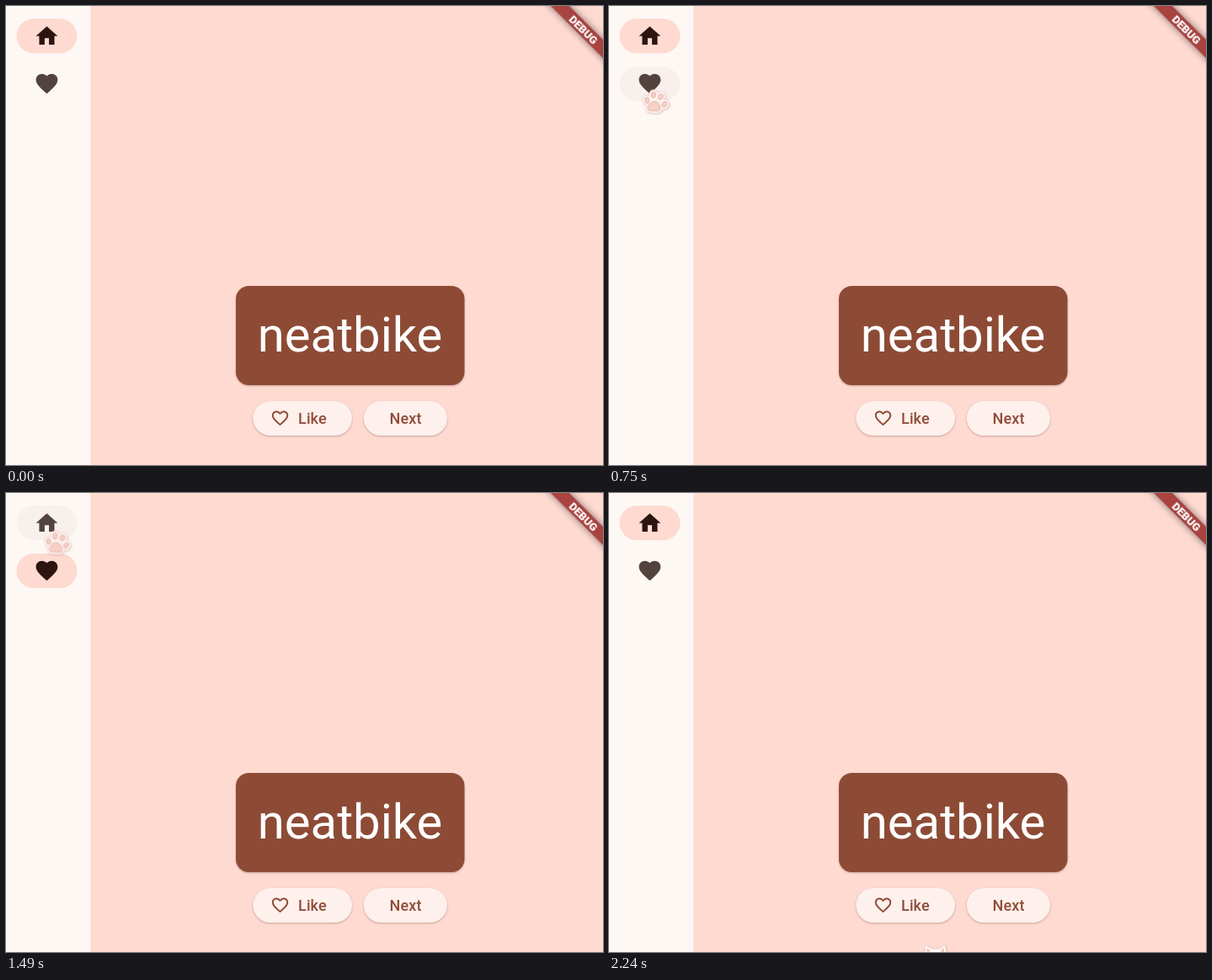
Animation, 709 px wide and 546 px high, one loop 2320 ms. Source, as an HTML page:

```html
<!DOCTYPE html>
<html lang="en">
<head>
<meta charset="utf-8">
<title>Word pair app</title>
<style>
  html, body { margin: 0; width: 100%; height: 100%; overflow: hidden; background: #fedad1; }
  svg { display: block; font-family: Roboto, "Noto Sans", sans-serif; }
  .indicator { fill: #fedad1; transform-box: fill-box; transform-origin: center; }
  .hover { fill: #6b2a2a; opacity: 0; }
  .card { fill: #8d4b36; filter: drop-shadow(0 1px 1px rgba(80, 30, 15, .3)); }
  .word { font-size: 58px; fill: #fff; }
  .button rect { fill: #fef0ec; filter: drop-shadow(0 1px 1px rgba(90, 40, 25, .32)); }
  .button { font-size: 18px; font-weight: 500; letter-spacing: .13px; fill: #8f4c38; }
  .band { fill: #a84340; filter: drop-shadow(0 0 4px rgba(0, 0, 0, .5)); }
  .debug { font-size: 13.2px; font-weight: 900; fill: #fff; text-anchor: middle; }
  #cursor { filter: drop-shadow(1px 1px 1px rgba(150, 80, 65, .25)); }
</style>
</head>
<body>
<svg width="709" height="546" viewBox="0 0 709 546">
  <defs>
    <path id="heart" d="M12 21.35l-1.45-1.32C5.4 15.36 2 12.28 2 8.5 2 5.42 4.42 3 7.5 3c1.74 0 3.41.81 4.5 2.09C13.09 3.81 14.76 3 16.5 3 19.58 3 22 5.42 22 8.5c0 3.78-3.4 6.86-8.55 11.54z"/>
    <g id="pads">
      <ellipse cx="-10" cy="-2" rx="2.7" ry="3.5" transform="rotate(-18 -10 -2)"/>
      <ellipse cx="-3" cy="-9" rx="2.9" ry="3.7"/>
      <ellipse cx="5.8" cy="-7.6" rx="2.9" ry="3.7" transform="rotate(14 5.8 -7.6)"/>
      <ellipse cx="11" cy="1" rx="2.7" ry="3.5" transform="rotate(32 11 1)"/>
      <path d="M-8.5 6.5C-8 2-4-2 0-1.500C4-1 7 3 6.500 7C6 10.500 2 10 -1 10C-4 10-9 11-8.500 6.500Z"/>
    </g>
  </defs>

  <rect width="709" height="546" fill="#fedad1"/>
  <rect width="100.300" height="546" fill="#fef8f5"/>

  <rect id="homePill" class="indicator" x="12.5" y="15" width="72" height="41.300" rx="20.650"/>
  <rect id="homeHover" class="hover" x="12.5" y="15" width="72" height="41.300" rx="20.650"/>
  <rect id="likesPill" class="indicator" x="12.5" y="72" width="72" height="41.300" rx="20.650"/>
  <rect id="likesHover" class="hover" x="12.5" y="72" width="72" height="41.300" rx="20.650"/>
  <g transform="translate(33 20.300) scale(1.29)">
    <path id="homeIcon" d="M10 20v-6h4v6h5v-8h3L12 3 2 12h3v8z"/>
  </g>
  <g transform="translate(33 76.800) scale(1.29)">
    <use id="likesIcon" href="#heart"/>
  </g>

  <rect class="card" x="273" y="333" width="271.500" height="118" rx="15.500"/>
  <text class="word" x="298.800" y="411">neatbike</text>

  <g class="button">
    <rect x="293.300" y="470" width="117.700" height="41" rx="20.500"/>
    <g transform="translate(313.900 478.700) scale(.968)">
      <path fill-rule="evenodd" d="M16.5 3c-1.74 0-3.41.81-4.5 2.09C10.91 3.81 9.24 3 7.5 3 4.42 3 2 5.42 2 8.5c0 3.78 3.4 6.86 8.55 11.54L12 21.35l1.45-1.32C18.6 15.36 22 12.28 22 8.5 22 5.42 19.58 3 16.5 3zm-4.4 15.55l-.1.1-.1-.1C7.14 14.24 4 11.39 4 8.5 4 6.5 5.5 5 7.5 5c1.54 0 3.04.99 3.57 2.36h1.87C13.46 5.99 14.96 5 16.5 5c2 0 3.5 1.5 3.5 3.5 0 2.89-3.14 5.74-7.9 10.05z"/>
    </g>
    <text x="347" y="497">Like</text>
  </g>
  <g class="button">
    <rect x="424.700" y="470" width="99.300" height="41" rx="20.500"/>
    <text x="455.500" y="497">Next</text>
  </g>

  <g transform="translate(686 28) rotate(45)">
    <rect class="band" x="-60" y="-7.750" width="120" height="15.500"/>
    <text class="debug" y="4.700">DEBUG</text>
  </g>

  <g id="cursor">
    <g id="cat">
      <path fill="#fffdfc" stroke="#efcfc7" stroke-width=".7" stroke-linejoin="round"
        d="M-12-14L-4-9.500Q0-10 4-9.500L11-14L13-4Q15 0 14 4Q12 11 5 12L-7 12Q-14 10-14 3Q-14.500-2-13-5Z"/>
      <path fill="#f5c9c0" d="M-11-11l5 3-4 4zM10-11l-5 3 5 4z"/>
      <circle cx="-9.500" cy="3" r="1.900" fill="#a8776c"/>
      <circle cx="2.500" cy="4" r="1.900" fill="#a8776c"/>
      <ellipse cx="-3.600" cy="6.500" rx="1.200" ry=".8" fill="#e9a79b"/>
      <path fill="#fffdfc" stroke="#efcfc7" stroke-width=".6" d="M-13 11a3 3 0 0 1 6 1q-3 4-6-1zM3 12a3 3 0 0 1 6 0q-3 4-6 0z"/>
    </g>
    <g id="paw" transform="translate(-1 0) rotate(5)">
      <use href="#pads" fill="#f3cbc2" stroke="#f3cbc2" stroke-width="5.500"/>
      <use href="#pads" fill="#fffaf8" stroke="#fffaf8" stroke-width="4.300"/>
      <use href="#pads" fill="#f8cfc5" stroke="#dda99e" stroke-width=".8"/>
    </g>
  </g>
</svg>

<script>
const LOOP = 2320;
// The picture is refreshed only at these moments.
const TICKS = [0, 90, 160, 250, 320, 410, 490, 580, 650, 750, 840, 910, 1000, 1070, 1170,
  1250, 1330, 1410, 1490, 1610, 1690, 1770, 1830, 1910, 2000, 2080, 2160, 2240];
const DARK = '#2c1510', SOFT = '#53433f', MID = '#422c27';
const tracks = [];

// Each key is [ms, value]; values run linearly between keys.
function track(id, prop, keys, easing = 'linear') {
  const all = [[0, keys[0][1]], ...keys, [LOOP, keys[keys.length - 1][1]]];
  const frames = all.map(([ms, value]) => ({ offset: ms / LOOP, [prop]: value, easing }));
  const anim = document.getElementById(id).animate(frames, { duration: LOOP, fill: 'both' });
  anim.pause();
  tracks.push(anim);
}

const at = (ms, x, y) => [ms, `translate(${x}px, ${y}px)`];

track('cursor', 'transform', [
  at(0, 390, 570), at(90, 330, 490), at(320, 169.5, 277), at(410, 112, 196), at(490, 76, 146),
  at(580, 59, 119), at(650, 56, 115), at(1000, 56, 115), at(1070, 56, 112), at(1250, 56, 108),
  at(1410, 60, 66), at(1490, 61.5, 60.5), at(1610, 61.5, 60), at(1690, 63, 62), at(1770, 71, 69),
  at(1830, 85.5, 85), at(1910, 126, 136), at(2000, 193, 238), at(2240, 388, 552)
]);
track('cat', 'opacity', [[0, 1], [580, 0], [1910, 1]], 'step-end');
track('paw', 'opacity', [[0, 0], [580, 1], [1910, 0]], 'step-end');

track('likesHover', 'opacity', [
  [580, 0], [750, .035], [1000, .04], [1070, .08], [1250, .03], [1330, .02], [1410, 0]
]);
track('homeHover', 'opacity', [
  [1330, 0], [1410, .03], [1490, .035], [1610, .05], [1690, .08], [1770, .02], [1830, 0]
]);

track('homePill', 'opacity', [[1070, 1], [1250, 0], [1610, 0], [1770, 1]]);
track('likesPill', 'opacity', [[1070, 0], [1250, 1], [1610, 1], [1770, 0]]);
track('homePill', 'transform', [
  [1250, 'scaleX(1)'], [1251, 'scaleX(.4)'], [1610, 'scaleX(.4)'], [1770, 'scaleX(1)']
]);
track('likesPill', 'transform', [[1070, 'scaleX(.4)'], [1250, 'scaleX(1)']]);

track('homeIcon', 'fill', [[1000, DARK], [1070, MID], [1170, SOFT], [1610, SOFT], [1770, DARK]]);
track('likesIcon', 'fill', [[1000, SOFT], [1070, MID], [1170, DARK], [1610, DARK], [1770, SOFT]]);

const start = performance.now();
function draw() {
  const t = (performance.now() - start) % LOOP;
  const tick = TICKS.findLast(ms => ms <= t);
  for (const anim of tracks) anim.currentTime = tick;
  requestAnimationFrame(draw);
}
draw();
</script>
</body>
</html>
```
